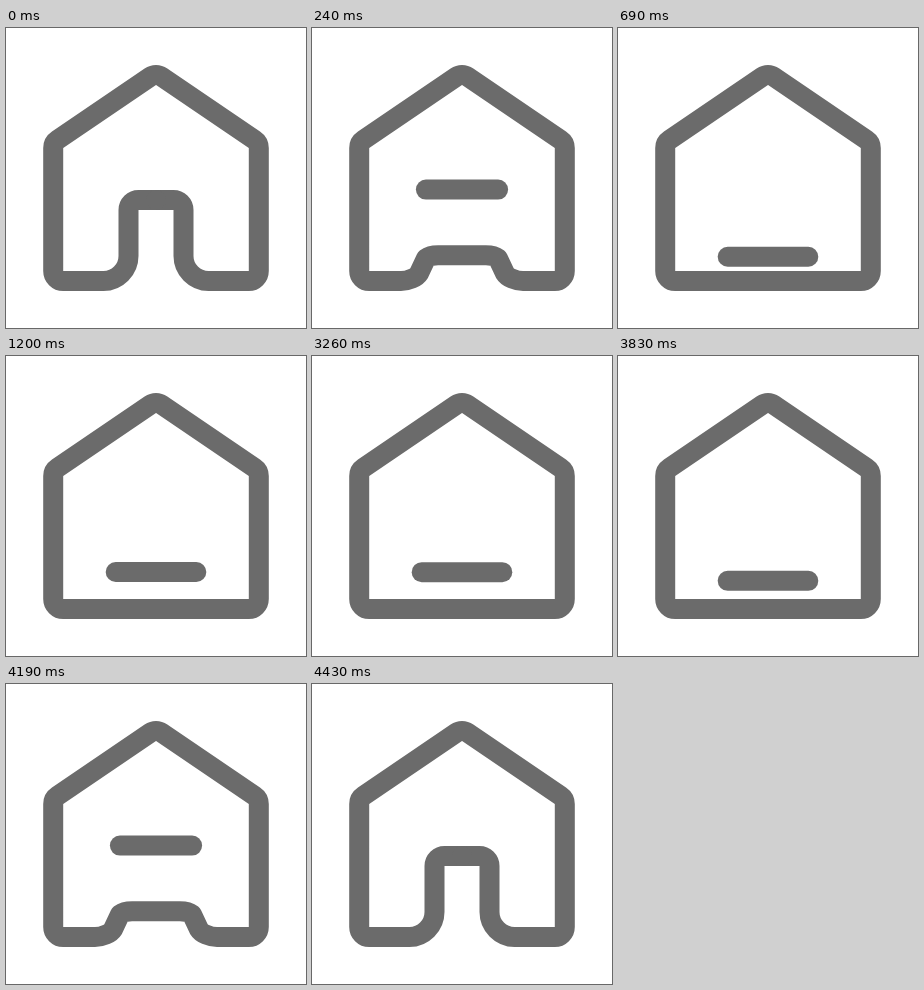
Write an HTML page that moves like this. It is 300 px wide and 300 px high and loops after 6460 ms.

```html
<!DOCTYPE html>
<html lang="en">
<head>
<meta charset="utf-8">
<title>Home icon</title>
<style>
  html, body { margin: 0; width: 100%; height: 100%; overflow: hidden; background: #fff; }
  svg { display: block; width: 100vw; height: 100vh; }
  path { fill: none; stroke: #6b6b6b; stroke-width: 20; stroke-linecap: round; stroke-linejoin: round; }
</style>
</head>
<body>
<svg viewBox="0 0 300 300">
  <path id="house"/>
  <path id="bar"/>
</svg>
<script>
const LOOP = 6460, MOVE = 1200, BACK = 3230, STEP = 30;
const FLOOR = 253, LINTEL = 172, WALL = 122.5;

const house = document.getElementById('house');
const bar = document.getElementById('bar');
const mix = (a, b, k) => a + (b - a) * k;
const smooth = k => k * k * (3 - 2 * k);
const span = (t, from, to) => Math.min(1, Math.max(0, (t - from) / (to - from)));

// cubic-bezier(x1, 0, x2, 1)
function ease(x, x1, x2) {
  let lo = 0, hi = 1;
  for (let i = 0; i < 24; i++) {
    const s = (lo + hi) / 2, r = 1 - s;
    if (3 * r * r * s * x1 + 3 * r * s * s * x2 + s ** 3 < x) lo = s; else hi = s;
  }
  return smooth(lo);
}

// Rounded corner from a to b around c, as a near-circular cubic
function corner(a, c, b) {
  const pull = p => p.map((v, i) => mix(v, c[i], .55));
  return `L${a}C${pull(a)} ${pull(c === b ? c : b)} ${b}`;
}

// Doorway: the walls spread into a soft wave while sinking to the floor.
function doorway(closed) {
  const at = (x, y, flatX) => [mix(x, flatX, closed), mix(y, FLOOR, closed)];
  const foot = [at(WALL - 25, FLOOR, 85), at(WALL, FLOOR, 93), at(WALL, FLOOR - 25, 100)];
  const head = [at(WALL, LINTEL + 10, 110), at(WALL, LINTEL, 116), at(WALL + 10, LINTEL, 123)];
  const flip = points => points.map(([x, y]) => [300 - x, y]).reverse();
  return [foot, head, flip(head), flip(foot)].map(p => corner(...p)).join('');
}

function housePath(closed) {
  return `M57.2 253${doorway(closed)}L242.8 253A10 10 0 0 0 252.8 243` +
    `V120A10 10 0 0 0 248.4 111.8L155.7 48.8A10 10 0 0 0 144.3 48.8` +
    `L51.6 111.8A10 10 0 0 0 47.2 120V243A10 10 0 0 0 57.2 253Z`;
}

// The bar grows out of the lintel, lifts a little, drops too far and settles.
function barPath(t) {
  const half = 40.3 * smooth(span(t, 0, 300));
  const y = LINTEL - 11 * smooth(span(t, 0, 280)) +
    68 * ease(span(t, 280, 720), .3, .3) - 13 * smooth(span(t, 720, MOVE));
  return `M${150 - half} ${y}h${2 * half}`;
}

// The move plays forward, rests, then plays backward.
function pose(ms) {
  const step = v => Math.min(MOVE, Math.floor(v / STEP) * STEP);
  return ms < BACK ? step(ms) : MOVE - step(ms - BACK);
}

const start = performance.now();
function tick() {
  const t = pose((performance.now() - start) % LOOP);
  house.setAttribute('d', housePath(ease(span(t, 0, 585), .3, .2)));
  bar.setAttribute('d', barPath(t));
  requestAnimationFrame(tick);
}
tick();
</script>
</body>
</html>
```
